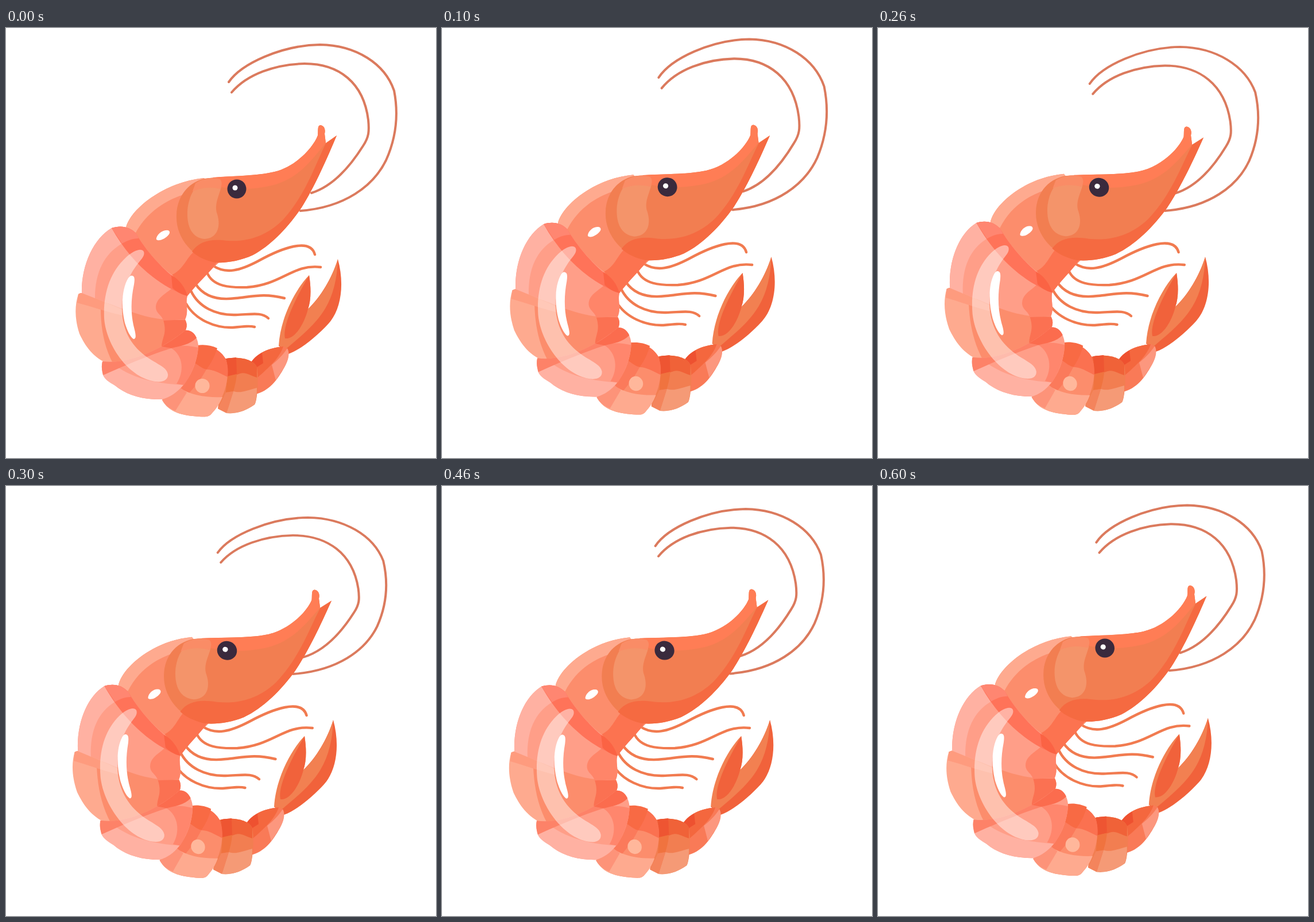
An HTML page that plays this animation: 749 px wide and 748 px high, repeating every 700 ms.

```html
<!DOCTYPE html>
<html lang="en">
<head>
<meta charset="utf-8">
<title>Shrimp</title>
<style>
html, body { margin: 0; width: 100%; height: 100%; overflow: hidden; background: #fff }
svg { display: block; width: 100%; height: 100% }
.line { fill: none; stroke-linecap: round }
</style>
</head>
<body>
<svg viewBox="0 0 749 748">
  <g id="feelers" class="line" stroke="#db7a5d" stroke-width="4">
    <path d="M388 94C410 62 480 30 547 29C610 30 660 62 676 109C684 150 680 190 662 230C640 275 590 312 513 318"/>
    <path d="M393 112C420 80 470 63 520 62C580 62 623 95 631 160C633 180 632 190 622 205C600 240 570 275 532 287"/>
  </g>

  <g id="legs" class="line" stroke="#f17b50" stroke-width="4.4">
    <path d="M360 413C383 429 408 422 440 405C480 383 530 364 538 394"/>
    <path d="M350 425C360 450 390 452 420 451C480 447 500 410 548 416"/>
    <path d="M330 445C345 468 370 474 400 470C430 467 450 461 485 470"/>
    <path d="M322 457C335 485 365 500 400 499C430 498 445 494 457 505"/>
    <path d="M314 480C330 508 365 522 395 521C415 519 425 518 433 520"/>
  </g>

  <g id="tail">
    <!-- fan -->
    <path fill="#f1623b" d="M578 402C590 445 584 490 562 514C540 538 512 560 492 567L475 553L526 489C548 468 568 435 578 402Z"/>
    <path fill="#f28051" d="M578 402C568 435 548 468 526 489C531 475 532 455 528 430C508 450 478 500 475 553L488 558C515 535 540 515 556 488C570 465 577 435 578 402Z"/>
    <path fill="#f1623b" d="M528 430C512 458 480 515 486 540C505 542 521 510 526 489C531 475 532 455 528 430Z"/>
    <!-- last joint -->
    <path fill="#f97a57" d="M426 583C440 561 465 556 483 554C495 556 494 574 485 590C473 612 458 632 434 637Z"/>
    <path fill="#f4673e" d="M426 583C440 561 465 556 483 554C475 578 452 595 434 612Z"/>
    <path fill="#ee5130" d="M426 583C432 573 440 568 446 565L448 583L437 590Z"/>
    <path fill="#fc977e" d="M490 557C495 566 492 578 485 590L470 613L463 586C475 576 484 567 490 557Z"/>
    <!-- fifth joint -->
    <path fill="#f27e51" d="M380 576C400 571 430 574 437 590C441 615 437 650 433 655C412 670 390 675 369 662Z"/>
    <path fill="#f06238" d="M380 576C400 571 430 574 437 590V608C428 606 418 598 408 601C398 604 390 608 384 606Z"/>
    <path fill="#f59a76" d="M396 632C410 636 420 630 437 626C437 642 435 652 433 655C417 666 401 672 384 670Z"/>
    <path fill="#ee5532" d="M383 575L401 573L402 602L385 606Z"/>
    <path fill="#f0733f" d="M385 606L402 602C401 615 398 625 396 632L383 634Z"/>
    <path fill="#f4845c" d="M383 634L396 632L384 670L369 662Z"/>
  </g>

  <g id="body">
    <!-- fourth joint -->
    <path fill="#fc8d6c" d="M325 554C345 548 371 555 383 576C391 604 384 640 358 671C352 678 345 676 336 676C307 674 284 669 272 647Z"/>
    <path fill="#fb7150" d="M325 554C345 548 371 555 383 576C387 588 387 598 386 607C373 601 362 594 349 594L325 590Z"/>
    <path fill="#f86a44" d="M333 552C345 550 358 552 368 557C363 573 356 585 349 594C340 592 334 585 325 581Z"/>
    <path fill="#fb7a5b" d="M325 581C334 585 340 592 349 594C337 616 325 628 315 640L300 622Z"/>
    <path fill="#feaa8f" d="M300 625C324 640 350 643 377 642C371 656 365 664 358 671C352 678 345 676 336 676C307 674 284 669 272 647Z"/>
    <path fill="#fd9379" d="M300 623L315 634L295 666C284 662 277 656 272 647Z"/>
    <circle cx="342" cy="622.5" r="12.6" fill="#ffb79b"/>
    <!-- second joint -->
    <path fill="#feaa8f" d="M126 463C132 459 140 461 146 466L250 500L312 507C318 518 314 530 300 541C265 565 220 580 178 584C151 573 138 553 128 532C120 508 119 484 126 463Z"/>
    <path fill="#fc8d6c" d="M165 475L250 500L312 507C318 518 314 530 300 541C270 562 232 576 186 583C169 550 164 515 165 475Z"/>
    <path fill="#fe9b7e" d="M126 463C132 459 140 461 146 466L203 490V500C172 493 148 484 124 478Z"/>
    <path fill="#fb7152" d="M274 508H312C318 518 314 530 300 541L271 554C272 537 281 532 274 508Z"/>
    <!-- third joint -->
    <path fill="#ff9e88" d="M168 580C215 586 275 557 312 526C324 524 334 537 335 552C334 590 310 635 272 646C238 647 209 638 190 622C174 611 163 600 168 580Z"/>
    <path fill="#ffb1a2" d="M169 604L196 591C230 613 270 619 309 621C298 634 286 642 272 646C238 647 209 638 190 622C179 616 172 611 169 604Z"/>
    <path fill="#ff866d" d="M288 557C302 551 318 552 335 556C333 580 323 602 310 621L297 619C311 598 309 570 288 557Z"/>
    <path fill="#fd8268" d="M168 580C215 586 275 557 312 526C309 542 300 550 288 557C250 569 205 588 169 604C167 596 166 588 168 580Z"/>
    <path fill="#fb6c4e" d="M271 554C288 545 301 535 312 526C321 525 328 530 332 539C320 551 304 553 288 557Z"/>
    <!-- thorax -->
    <path fill="#fc8d6c" d="M209 347C217 315 275 268 345 261L380 400C345 430 330 450 316 466L240 420Z"/>
    <path fill="#feaa8f" d="M209 347C217 315 275 268 345 261L360 280C305 284 253 307 226 356Z"/>
    <path fill="#fc7350" d="M288 430C310 420 314 399 329 388L367 408C356 425 333 444 316 466L284 448Z"/>
    <!-- first joint -->
    <path fill="#ff9e88" d="M184 348C199 343 216 345 227 358C245 390 275 420 290 430L316 466C312 478 319 493 312 507C250 513 205 488 132 461C131 412 153 366 184 348Z"/>
    <path fill="#ffb1a2" d="M184 348L202 375C171 393 155 425 155 470L132 461C131 412 153 366 184 348Z"/>
    <path fill="#ff8569" d="M290 452L316 466C312 478 319 493 312 507L274 509C271 498 261 497 261 485C262 470 276 464 290 452Z"/>
    <path fill="#ff7359" d="M184 348C199 343 216 345 227 358C245 390 275 420 288 430L316 466C265 449 217 407 184 348Z"/>
    <path fill="#ff8671" d="M184 348C199 343 216 345 227 358L231 366C220 366 211 370 202 375Z"/>
    <path fill="#fb6344" d="M288 430C303 438 312 452 316 466C305 464 296 458 290 452Z"/>
    <!-- shine -->
    <path fill="#fff" opacity=".45" d="M240 389C236 382 222 387 209 399C181 425 169 462 171 505C174 550 212 608 260 615C275 617 283 611 282 602C280 592 270 588 261 582C226 563 203 535 202 490C202 450 219 423 232 407C238 400 242 395 240 389Z"/>
    <path fill="#fff" d="M220 431C225 432 224 439 223 446C217 474 217 500 224 525C227 537 226 541 222 541C216 537 211 526 207 513C200 484 202 453 213 435C216 431 218 430 220 431Z"/>
    <path fill="#fff" d="M262 368C261 362 270 352 279 352C285 351 287 356 283 360C278 366 267 372 262 368Z"/>
  </g>

  <g id="head">
    <path fill="#f27e51" d="M345 262C385 257 435 258 468 250C505 241 535 208 543 187C544 178 542 169 548 169C554 170 557 176 555 184L557 200L576 187C563 218 540 272 515 312C492 346 462 378 430 395C408 405 385 409 365 408C325 400 295 365 297 325C298 295 315 270 345 262Z"/>
    <path fill="#f4946a" d="M375 264C379 282 360 302 368 324C375 347 367 366 346 367C324 365 315 346 316 319C318 291 331 268 352 263Z"/>
    <path fill="#ff7d55" d="M360 260C395 257 435 258 468 250C505 241 535 208 543 187C544 178 542 169 548 169C554 170 557 176 555 184L557 200C534 227 514 258 470 272C432 282 400 282 372 276Z"/>
    <path fill="#fa8c66" d="M330 270C345 260 360 259 373 263C377 268 376 274 373 280C357 276 343 277 325 284Z"/>
    <path fill="#f56a41" d="M576 187C563 218 540 272 515 312C492 346 462 378 430 395C408 405 385 409 365 408C348 405 334 398 324 389C336 371 356 366 385 370C428 373 459 357 483 333C522 290 540 235 557 201Z"/>
    <circle cx="402" cy="280" r="16.5" fill="#3a2a3d"/>
    <circle cx="399" cy="278" r="4.5" fill="#fff"/>
  </g>
</svg>
<script>
// Key values of the loop, one per 100 ms: lean to the left, drop, feeler whip.
const lean = [0, .55, 1, 1, .85, .85, .4];
const drop = [0, -4, -4, 5, 5, 5, 1.5];
const whip = [0, -6, 3, 13, 2, 0, 1];

// Shift of the point (x, y) in each part.
const shift = {
  feelers: (x, y, s, d, w) => [-s * (13 + .028 * (318 - y)), d + 4 * s + w * (318 - y) / 224],
  legs: (x, y, s, d) => [-s * (18 - .02 * (x - 362)), d],
  tail: (x, y, s, d) => [-s * 8, d],
  body: (x, y, s, d) => [
    -s * (6.5 + .032 * (x - 125) - .037 * (y - 462)),
    d + s * (.016 * (x - 342) + .009 * (y - 622))],
  head: (x, y, s, d) => [-s * (17 - .046 * (x - 402)), d + s * .035 * (x - 365)]
};

// The shifts are linear, so three points give the matrix.
function matrix(at) {
  const [e, f] = at(0, 0), [ax, ay] = at(1, 0), [bx, by] = at(0, 1);
  return `matrix(${[1 + ax - e, ay - f, bx - e, 1 + by - f, e, f]})`;
}

const start = performance.now();
function draw() {
  const i = Math.floor((performance.now() - start) / 100) % lean.length;
  for (const id in shift) {
    const at = (x, y) => shift[id](x, y, lean[i], drop[i], whip[i]);
    document.getElementById(id).setAttribute('transform', matrix(at));
  }
  requestAnimationFrame(draw);
}
draw();
</script>
</body>
</html>
```
